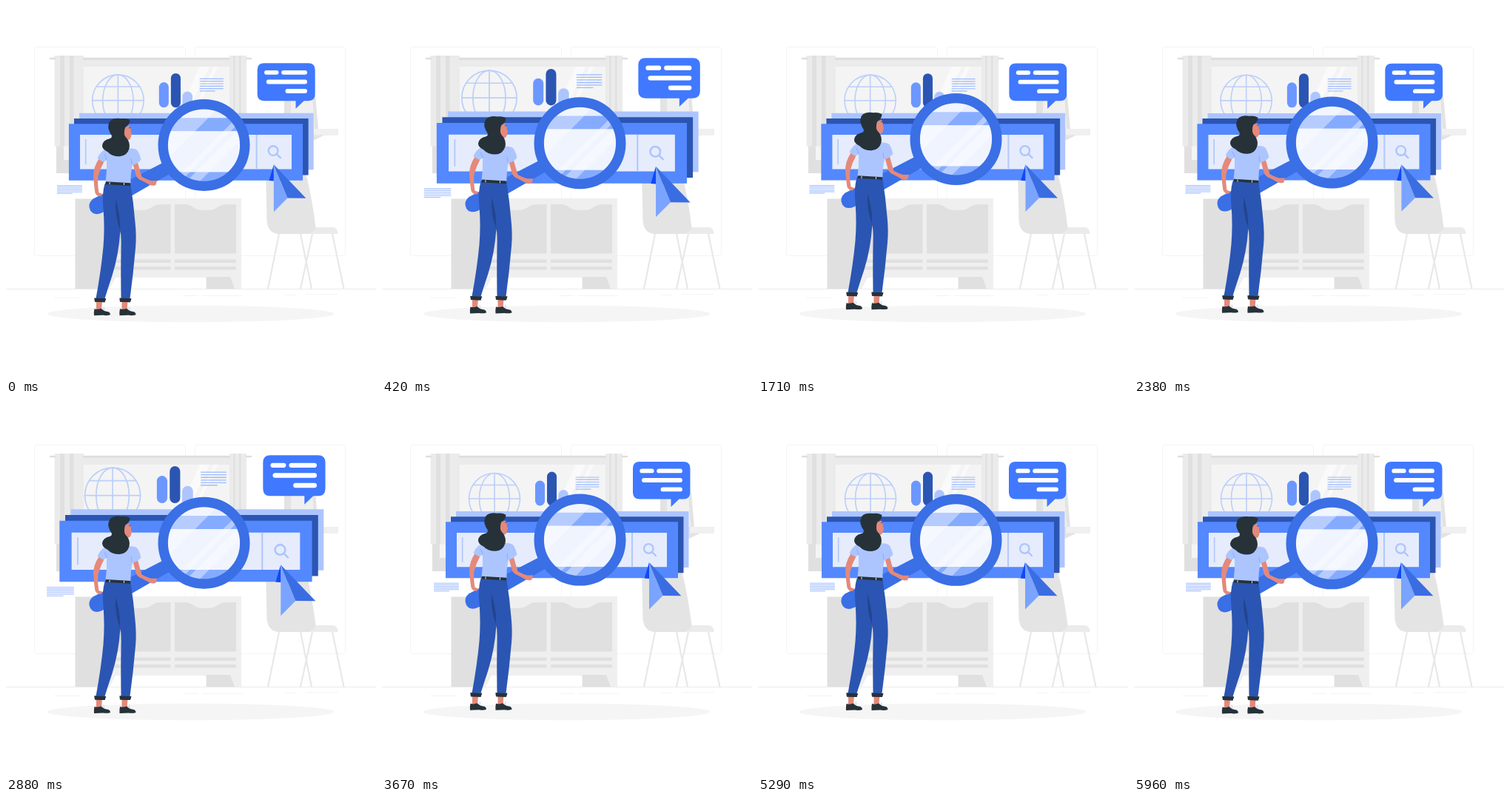
Animation, 500 px wide and 500 px high, one loop 6000 ms. Source, as an HTML page:

```html
<!DOCTYPE html>
<html lang="en">
<head>
<meta charset="utf-8">
<title>Search illustration</title>
<style>
html, body { margin: 0; width: 100%; height: 100%; overflow: hidden; background: #fff; }
svg { display: block; width: 100vw; height: 100vh; }
.line { fill: none; stroke-linecap: round; }
</style>
</head>
<body>
<svg viewBox="0 0 500 500">
  <defs>
    <clipPath id="lens"><circle cx="267.5" cy="188.3" r="50"/></clipPath>
    <g id="shoe">
      <path fill="#e4897b" d="M122 399h8l-1 12h-7z"/>
      <path fill="#263238" d="M119.500 409.500q5 1.500 9-.5 4 4 10 4.500 2.500 1 2.500 4-5 1.500-10 .5l-12 .5q-.5-5 .5-9z"/>
      <path class="line" stroke="#c9d8fb" d="M130 408.500l3 2.500M132 407l1 3"/>
      <path fill="#263238" d="M119.500 395l15.500.5-1.500 5-13.500-.5z"/>
    </g>
  </defs>

  <!-- room -->
  <g fill="none" stroke="#f4f4f4">
    <rect x="38.500" y="55.500" width="204" height="282" rx="3"/>
    <rect x="255" y="55.500" width="203.500" height="282" rx="3"/>
    <path d="M65 394.500h35M240 391.500h20M265 391.500h55M377 390.500h15M405 389.500h43"/>
    <path stroke="#ebebeb" d="M0 382.500h500"/>
  </g>
  <ellipse cx="249.500" cy="416" rx="194" ry="11.300" fill="#f5f5f5"/>

  <!-- window -->
  <path fill="#e0e0e0" d="M68 72h254v154H68z"/>
  <path fill="#ebebeb" d="M78 73h236v9H78z"/>
  <path fill="#f4f4f4" d="M78 82h236v126H78z"/>
  <path fill="#fafafa" d="M262 82h13l-30 63h-13zM281 82h5l-30 63h-5z"/>
  <path fill="#ebebeb" d="M65.500 67h39.500v122.500H65.500zM302 67h23v123h-23z"/>
  <path fill="#e0e0e0" d="M73 67h6v122.500h-6zM86 67h5.500v122.500H86zM307 67h2.500v123H307zM315 67h2.500v123H315z"/>
  <path class="line" stroke="#dedede" stroke-width="2.600" d="M60 71h6M105 71h197M325 71h6"/>

  <!-- chairs -->
  <path fill="#e3e3e3" d="M376 120h42l4 46h26.500v8.500H430l-14 7h-40z"/>
  <path fill="#f0f0f0" d="M385 120h29l3 46h-32zM416 166h30q2.500 0 2.500 2.500v6H416z"/>
  <path class="line" stroke="#e8e8e8" stroke-width="2.200" d="M369 308l-15 74M398 308l15 74M414 308l-16 74M441 308l15.500 74"/>
  <path fill="#ebebeb" d="M362 299h80q6.500 1 6.500 9H370z"/>
  <path fill="#e4e4e4" d="M351 225h54q9 36 13.500 74-1 5-9 9h-42q-14-2-15-18z"/>

  <!-- cabinet -->
  <path fill="#e0e0e0" d="M93.500 260.500H318V382H93.500z"/>
  <path fill="#efefef" d="M132 260.500h186V382h-9l-6-16H148l-8 16h-8z"/>
  <path fill="#fff" d="M148 366.500h122.500v15.500H140z"/>
  <path fill="#e0e0e0" d="M139 268h83.500v66.500H139zM228 268h83v66.500h-83zM139 342.500h83.500v4.500H139zM228 342.500h83v4.500h-83zM139 352h83.500v4.500H139zM228 352h83v4.500h-83z"/>
  <path fill="#efefef" d="M152 267.500q8 1 13 5 5 3.500 15.500 3.500t15.500-3.500q5-4 13-5zM241 267.500q8 1 13 5 5 3.500 15.500 3.500t15.500-3.500q5-4 13-5z"/>

  <g id="board">
    <g class="line" stroke="#bccffa" stroke-width="1.600">
      <circle cx="152" cy="128" r="34.500"/>
      <ellipse cx="152" cy="128" rx="20.500" ry="34.500"/>
      <path d="M152 93.500v69M117.500 128h69M123 109.500h58"/>
    </g>
    <rect x="207" y="103.500" width="13" height="34" rx="6.500" fill="#6c97ff"/>
    <rect x="223" y="91.500" width="13" height="46" rx="6.500" fill="#2b55b2"/>
    <rect x="238.500" y="116" width="13.500" height="34" rx="6.700" fill="#adc5ff"/>
    <path class="line" stroke="#9dbaff" stroke-width="1.200" d="M262 99h31M262 102.200h31M262 105.500h31M262 108.800h31M262 112h31M262 115.200h20"/>
    <path class="line" stroke="#9dbaff" d="M70.500 242.200h33M70.500 244.300h33M70.500 246.500h33M70.500 248.600h33M70.500 250.700h33M70.500 252.800h20"/>

    <path fill="#adc5ff" d="M100 145h314.500v76H100z"/>
    <path fill="#2b55b2" d="M93 152.200h314.500v76H93z"/>
    <path fill="#5488ff" d="M86 159.300h314v76H86z"/>
    <path fill="#e6ecfb" d="M101 174h284v46.300H101z"/>
    <path fill="#b2c8fb" d="M107.800 180h1.700v34h-1.700zM337 174h2v46.300h-2z"/>
    <g class="line" stroke="#adc5ff" stroke-width="2.400">
      <circle cx="360.300" cy="195.400" r="6.300"/>
      <path d="M365 200l5 5"/>
    </g>

    <path fill="#4079ff" d="M348 78h59.500q9 0 9 9v32.500q0 9-9 9h-6L390.500 139v-10.500H348q-9 0-9-9V87q0-9 9-9z"/>
    <path class="line" stroke="#fff" stroke-width="5.800" d="M351.200 90.400h13.500M374.200 90.400h28.800M354 103h49M379.500 115.400h23.500"/>

    <path fill="#1049f5" d="M361 214l-6.300 21.500 6.300.5z"/>
    <path fill="#7aa4ff" d="M361 214v63.500l18.500-18.500z"/>
    <path fill="#3a6de2" d="M361 214l43.300 45.200-24.800-.2z"/>
  </g>

  <g id="float">
    <!-- magnifier -->
    <path fill="#3a6fe6" d="M117.500 261L214 211l9 15-93 53.500q-11 5-16-3-4.500-9 3.500-15.500z"/>
    <g clip-path="url(#lens)">
      <path fill="#e8eefc" d="M215 135h105v110H215z"/>
      <path fill="#85abff" d="M215 151.500h105v18H215zM215 224.500h105v20H215z"/>
      <path fill="#f0f4ff" d="M215 169.500h105v55H215z"/>
      <g fill="#fff" opacity=".4">
        <path d="M242 135h38L180 235h-38z"/>
        <path d="M254 135h36L190 235h-36z"/>
        <path d="M312 151h10l-93 93h-10zM330 151h18l-93 93h-18z"/>
      </g>
    </g>
    <circle cx="267.500" cy="188.300" r="55.300" fill="none" stroke="#3a6fe6" stroke-width="13.400"/>

    <!-- legs -->
    <use href="#shoe"/>
    <use href="#shoe" x="35" transform="translate(-.5)"/>
    <path fill="#2b55b2" d="M133.500 240.500l35 2q4 25 6 50 2 19 .5 35-3 35-7.500 68H155.500q-.5-40 0-65 .5-18-1-27-2 32-11 61-6 18-10 31h-12q7-38 10-70 2-25 0-52-2-20 2-33z"/>
    <path fill="#23458f" d="M148 262q-1 23 6.500 42l-.8 8q1-20-.7-29-2-13-5-21z"/>
    <path fill="#263238" d="M119.500 395l15.500.5-1.500 5-13.500-.5zM153.300 395l15.700.5-1.500 5-13.500-.5z"/>

    <!-- arms and torso -->
    <path fill="#e4897b" d="M126 206q-8 12-8 24 1 14 2.500 23 3 5 7 4.500l3.500-3-5.500-2q-2-12-1-22 3-11 8.500-21z"/>
    <path fill="#e4897b" d="M171 212l5 18q2 4 7 6 6 3 11 6 6 2 8.500 0l1.500-6q-5 .5-9 0-6-2-11.500-5-3-10-6-21z"/>
    <path fill="#adc5ff" d="M134 194l32-1q8-1 12 3 3 5 4.500 12-5 6-11.500 7-3 12-2.500 26l-34-2.500q2-14 1.500-30l-5 2.500-7.500-5q4-9 10.500-12z"/>
    <path class="line" stroke="#85a5ee" stroke-width=".8" d="M136 208q-1-5-3-7M170 214l-1-7"/>
    <path fill="#263238" d="M135 237.500l33.500 2-.5 3.700-34-2z"/>
    <path fill="#dce6fb" d="M139.500 238.300h1v3h-1zM159 239.300h1v3h-1z"/>

    <!-- head -->
    <path fill="#e4897b" d="M156 166l11-4q2 4 2 8 1.500 4 .5 5-1 6-5 6.500-8 0-8-7z"/>
    <path fill="#263238" d="M139 164q-1-9 6-11 5-1.500 11-.5 6-1 11.500 2-.5 6-4.500 8-3 2-3 8-1 5 4 9.500 4 6 2.500 13-3 10-13 10.500-11 0-16-6-8-4-7.500-9 1-7 10-9 4-1 2.500-5-4-5-3.500-10.500z"/>
    <path class="line" stroke="#263238" stroke-width=".8" d="M166.500 165l1.500-.5M142 157q-5 3-3 10"/>
  </g>
</svg>
<script>
const LOOP = 6000, LEAD = 40, CX = 243.3, CY = 177.7;
const board = document.getElementById("board");
const float = document.getElementById("float");

// Two heartbeats, then rest: [time, scale]
const beats = [[0, 1], [600, 1.1], [1800, 1], [2400, 1], [3000, 1.1], [3600, 1], [LOOP, 1]];

function scaleAt(t) {
  const i = beats.findIndex(b => t < b[0]);
  const [t0, s0] = beats[i - 1], [t1, s1] = beats[i];
  return s0 + (s1 - s0) * (t - t0) / (t1 - t0);
}

function draw(now) {
  const t = (now + LEAD) % LOOP;
  const lift = 10 * (1 - Math.abs(t % 3000 / 1500 - 1));
  board.setAttribute("transform", `translate(${CX} ${CY}) scale(${scaleAt(t)}) translate(${-CX} ${-CY})`);
  float.setAttribute("transform", `translate(0 ${-lift})`);
}

const start = performance.now();
function tick() {
  draw(performance.now() - start);
  requestAnimationFrame(tick);
}
tick();
</script>
</body>
</html>
```
